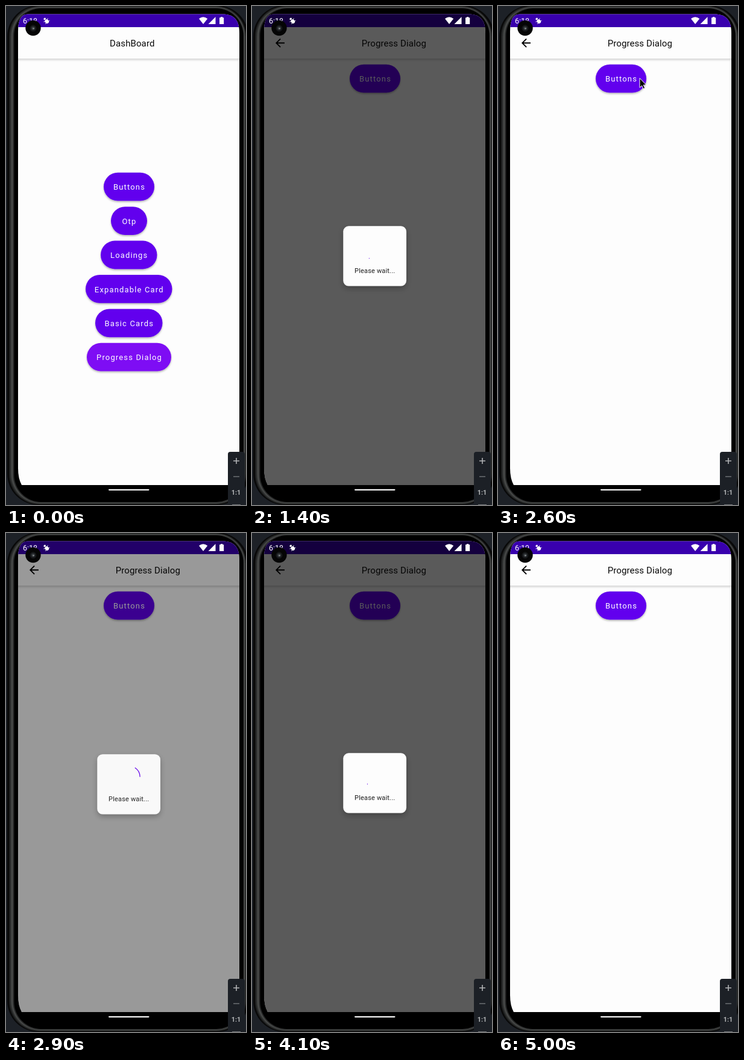
An HTML page for the animation above (5100 ms loop, 398 px wide and 826 px high).

```html
<!DOCTYPE html>
<html lang="en">
<head>
<meta charset="utf-8">
<title>Progress dialog</title>
<style>
html, body { margin: 0; width: 100%; height: 100%; overflow: hidden; background: #1d2127; }
svg { display: block; width: 398px; height: 826px; }
text { font-family: Roboto, sans-serif; }
.title { font-size: 15px; letter-spacing: .1px; fill: #0a0a0a; text-anchor: middle; }
.label { font-size: 13px; letter-spacing: 1.15px; fill: #fff; text-anchor: middle; }
.wait { font-size: 11px; letter-spacing: .17px; fill: #1e1e1e; text-anchor: middle; }
</style>
</head>
<body>
<svg viewBox="0 0 398 826">
  <defs>
    <clipPath id="screen">
      <path d="M20 42Q20 13.500 36 13.500H362Q383 15 386 34Q387 38 387 46V793H26Q20 782 20 765Z"/>
    </clipPath>
    <linearGradient id="drop" x1="0" x2="0" y1="0" y2="1">
      <stop offset="0" stop-color="#000" stop-opacity=".16"/>
      <stop offset="1" stop-color="#000" stop-opacity="0"/>
    </linearGradient>
    <filter id="soft" x="-30%" y="-40%" width="160%" height="190%">
      <feDropShadow dx="0" dy="1.8" stdDeviation="1.8" flood-color="#000" flood-opacity=".3"/>
    </filter>
    <filter id="deep" x="-30%" y="-30%" width="160%" height="170%">
      <feDropShadow dx="0" dy="4" stdDeviation="5" flood-color="#000" flood-opacity=".28"/>
    </filter>
  </defs>

  <!-- phone body -->
  <rect x="2" y="-1" width="400" height="827" rx="52" fill="#080808"/>
  <rect x="5" y="0" width="393" height="825" rx="50" fill="#1e1f1f"/>
  <rect x="7" y="1" width="390" height="823" rx="49" fill="#333534"/>
  <rect x="9" y="2" width="387" height="821" rx="48" fill="#484a49"/>
  <rect x="11.500" y="3" width="383" height="819" rx="46" fill="#262727"/>
  <rect x="13.500" y="4" width="380" height="817" rx="45" fill="#000"/>

  <g clip-path="url(#screen)">
    <rect x="20" y="13" width="367" height="780" fill="#fdfdfd"/>
    <rect x="20" y="13" width="367" height="22" fill="#3900ae"/>
    <rect x="20" y="87" width="367" height="5" fill="url(#drop)"/>
    <g id="home"><text class="title" x="209.3" y="67.300">DashBoard</text></g>
    <g id="page">
      <text class="title" x="235.3" y="67.300">Progress Dialog</text>
      <path transform="translate(35.2 50) scale(.94)" d="M20 11H7.83l5.59-5.59L12 4l-8 8 8 8 1.41-1.41L7.83 13H20z" fill="#000"/>
    </g>
    <rect id="scrim" x="20" y="13" width="367" height="780" fill="#000"/>
    <g id="dialog">
      <rect x="151.3" y="364.3" width="104.7" height="99.3" rx="9" fill="#fdfdfd" filter="url(#deep)"/>
      <path id="arc" fill="none" stroke="#6200ee" stroke-width="1.25"/>
      <text class="wait" x="203.7" y="442">Please wait...</text>
    </g>
    <g fill="#fff">
      <text id="clock" x="28" y="28.5" font-size="12.5">6:18</text>
      <g transform="translate(66.500 24) rotate(-40)">
        <ellipse cy="2" rx="3" ry="3.600"/>
        <ellipse cy="-3.600" rx="2" ry="1.500"/>
        <path d="M-4.500 -1L4.500 4M-4.500 4L4.500 -1" stroke="#fff" stroke-width=".8"/>
      </g>
      <path d="M320 21Q327 15.500 334.200 21L327.100 30Z"/>
      <path d="M347.500 18V30H335.500Z"/>
      <path d="M354 19.300H356V18H359.200V19.300H361.200V30H354Z"/>
    </g>
  </g>

  <rect x="170" y="799.7" width="67.500" height="2.200" rx="1.1" fill="#f2f2f2"/>

  <!-- camera -->
  <circle cx="45" cy="36.500" r="12.700" fill="#050505"/>
  <circle cx="45" cy="36.800" r="5.500" fill="#16181a"/>
  <circle cx="45" cy="36.800" r="3" fill="#34383b"/>
  <circle cx="45.500" cy="37.200" r="1.200" fill="#85898c"/>

  <!-- zoom panel -->
  <path d="M368 826V742Q368 738 372 738H392Q396 738 396 742V826Z" fill="#1c2026"/>
  <path d="M377 753H387M382 748V758" stroke="#b2b4b6" stroke-width="1.6"/>
  <path d="M377 779H387" stroke="#6d7073" stroke-width="1.5"/>
  <text x="381.500" y="809" font-size="11" font-weight="700" fill="#b2b4b6" text-anchor="middle">1:1</text>
  <path d="M375 825.500H389" stroke="#777a7d"/>

  <path id="cursor" d="M235 119.500V135L238.600 131.800L241 137.200L243.600 136L241.200 130.800H246Z" fill="#000" stroke="#fff" stroke-width="1"/>
</svg>
<script>
const LOOP = 5100, STEP = 100;
const SHADE = 0.643, ENTER = 250, EXIT = 153;
const TURN = 1332, BASE = 286, JUMP = 290;

const $ = id => document.getElementById(id);
const clamp = v => Math.max(0, Math.min(1, v));

function addButton(parent, label, left, right, top, color = '#6200ee') {
  parent.insertAdjacentHTML('beforeend',
    `<rect x="${left}" y="${top}" width="${right - left}" height="46.800" rx="23.400" fill="${color}" filter="url(#soft)"/>` +
    `<text class="label" x="${(left + right) / 2 + 0.5}" y="${top + 28.6}">${label}</text>`);
}

[
  ['Buttons', 162, 246],
  ['Otp', 174, 234],
  ['Loadings', 157, 250.5],
  ['Expandable Card', 132, 275.5],
  ['Basic Cards', 148, 259.5],
  ['Progress Dialog', 134, 274, '#7e10f4']
].forEach(([label, left, right, color], i) =>
  addButton($('home'), label, left, right, 275.8 + i * 56.4, color));
addButton($('page'), 'Buttons', 162, 246, 96.8);

// cubic-bezier(.4, 0, .2, 1)
function ease(x) {
  x = clamp(x);
  let lo = 0, hi = 1;
  for (let i = 0; i < 24; i++) {
    const u = (lo + hi) / 2, v = 1 - u;
    if (1.2 * v * v * u + 0.6 * v * u * u + u * u * u < x) lo = u; else hi = u;
  }
  return lo * lo * (3 - 2 * lo);
}

function arcPath(age) {
  const turn = Math.floor(age / TURN), phase = age % TURN, half = TURN / 2;
  const head = JUMP * ease(phase / half);
  const tail = JUMP * ease((phase - half) / half);
  const start = -90 + turn * (BASE + JUMP) + BASE * phase / TURN + tail;
  const sweep = Math.max(head - tail, 3);
  const point = deg => {
    const a = deg * Math.PI / 180;
    return `${(203.8 + 18.4 * Math.cos(a)).toFixed(2)} ${(402 + 18.4 * Math.sin(a)).toFixed(2)}`;
  };
  return `M${point(start)}A18.4 18.4 0 ${sweep > 180 ? 1 : 0} 1 ${point(start + sweep)}`;
}

// the first run stalls for one step
const runs = [
  { from: 100, to: 1935, age: t => t + 3 - Math.min(100, Math.max(0, t - 700)) },
  { from: 2746, to: 4584, age: t => t - 2746 }
];

function drawDialog(t) {
  const run = runs.find(r => t >= r.from && t < r.to + EXIT);
  let shade = 0, alpha = 0, shift = 0;
  if (run) {
    const age = run.age(Math.min(t, run.to));
    const p = clamp(age / ENTER);
    const q = clamp((t - run.to) / EXIT);
    const out = 1 - (1 - q) * (1 - q);
    shade = SHADE * p * (1 - out);
    alpha = clamp(p * 1.55) * (1 - out);
    shift = 13 * (1 - p) * (1 - p) - 9 * out;
    $('arc').setAttribute('d', arcPath(age));
  }
  $('scrim').setAttribute('opacity', shade);
  $('dialog').setAttribute('opacity', alpha);
  $('dialog').setAttribute('transform', `translate(0 ${shift.toFixed(2)})`);
}

function draw(t) {
  const fade = ease(t / 350);
  $('home').setAttribute('opacity', 1 - fade);
  $('page').setAttribute('opacity', fade);
  drawDialog(t);
  $('clock').textContent = t < 4300 ? '6:18' : '6:19';
  $('cursor').setAttribute('visibility', t >= 2500 && t < 2800 ? 'visible' : 'hidden');
}

let begin;
function tick(now) {
  if (begin === undefined) begin = now;
  draw(Math.floor(((now - begin) % LOOP) / STEP) * STEP);
  requestAnimationFrame(tick);
}
draw(0);
requestAnimationFrame(tick);
</script>
</body>
</html>
```
